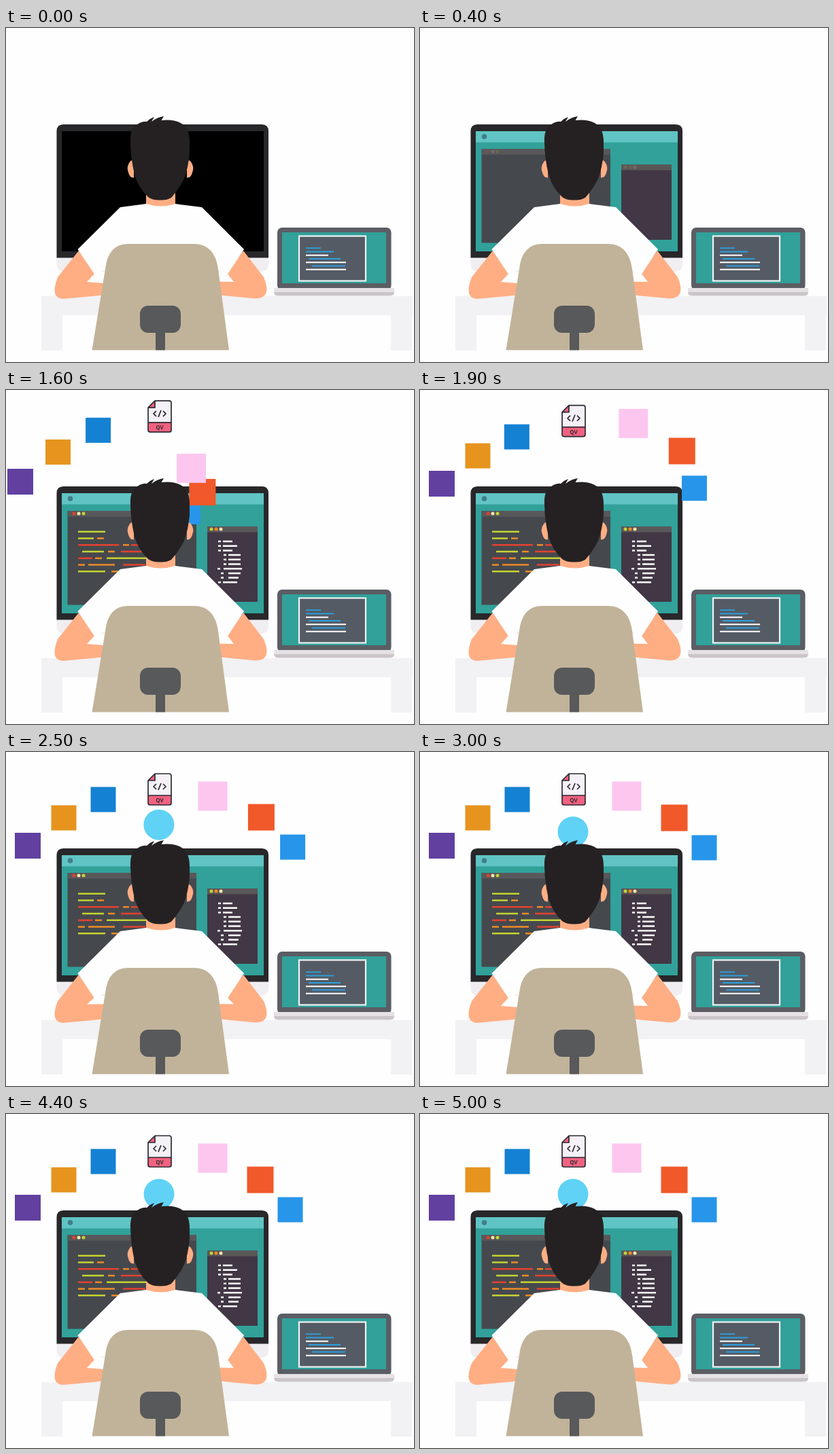
Animation, 600 px wide and 492 px high, one loop 5100 ms. Source, as an HTML page:

```html
<!DOCTYPE html>
<html lang="en">
<head>
<meta charset="utf-8">
<title>Developer at work</title>
<style>
html, body { margin: 0; width: 100%; height: 100%; overflow: hidden; background: #fefefe; }
svg { display: block; width: 600px; height: 492px; }
.tag { font: bold 8px "Open Sans", sans-serif; text-anchor: middle; fill: #3a2b35; }
</style>
</head>
<body>
<svg viewBox="0 0 600 492">
  <g fill="#f2f1f3">
    <rect x="52" y="395" width="546" height="28"/>
    <rect x="52" y="423" width="31" height="52"/>
    <rect x="566" y="423" width="31" height="52"/>
  </g>

  <rect x="74.500" y="142" width="311.500" height="217" rx="10" fill="#f0eef0"/>
  <path d="M74.500 338.500V152q0-10 10-10H376q10 0 10 10V338.500Z" fill="#28272a"/>
  <rect x="82" y="152" width="297" height="177" fill="#000"/>
  <g id="screen">
    <rect x="82" y="152" width="297" height="177" fill="#31a19a"/>
    <rect x="82" y="152" width="297" height="16.500" fill="#60c4c4"/>
    <circle cx="94.500" cy="160" r="3.800" fill="#417d8b"/>
  </g>
  <g id="windows">
    <rect x="90.500" y="178" width="189.500" height="138.500" fill="#45494e"/>
    <rect x="90.500" y="178" width="189.500" height="8.500" fill="#58585a"/>
    <rect x="296" y="201" width="74" height="111" fill="#423745"/>
    <rect x="296" y="201" width="74" height="8.500" fill="#5a5759"/>
  </g>
  <g id="dots"></g>
  <g id="code" stroke-width="2.500"></g>
  <svg x="296" y="210" width="74" height="102" viewBox="296 210 74 102">
    <g id="list" stroke="#fff" stroke-width="2.500"></g>
  </svg>

  <rect x="399" y="294" width="167.500" height="92" rx="7" fill="#5b5d64"/>
  <rect x="406" y="301" width="153" height="75" fill="#31a19a"/>
  <rect x="431" y="306.500" width="98" height="66" fill="#555b64" stroke="#f1f4f5" stroke-width="2.200"/>
  <g id="notes" stroke-width="1.900"></g>
  <path d="M394 383H571V389q0 5-6 5.500H400q-6-.5-6-5.500Z" fill="#cbc5c8"/>
  <rect x="394" y="383" width="177" height="6" fill="#e6e1e4"/>

  <g id="icons"></g>

  <g fill="#ffae84">
    <path d="M206 240H249V262L228 272 206 262Z"/>
    <path d="M188 196Q184 193 181 199 177 205 180 213 182 221 188 220.500Z"/>
    <path d="M266 196Q270 193 273 199 277 205 274 213 272 221 266 220.500Z"/>
    <path id="armL"/>
    <path id="armR"/>
  </g>
  <path d="M168 264 206 259Q228 266 249 259L288 264 350 326 326 362.500 312 357V400H145V356L130 362.500 105.500 326Z" fill="#fefefe"/>
  <path d="M183 168Q182 148 193 142 201 137 207 138 212 133 218 131L214 138Q223 131 232 130L228.500 136Q246 134 257 140 270 147 270 168V184Q268 206 262 222 254 238 243 250 236 254 227 253.500 216 254 209 249 195 236 189 216 183 190 183 168Z" fill="#252122"/>

  <path d="M126.500 474.500 146 355Q150 318 180 318H276Q307 318 312 355L328 474.500Z" fill="#c1b399"/>
  <rect x="197" y="409" width="60" height="40" rx="12" fill="#58595b"/>
  <rect x="220" y="448" width="14" height="26.500" fill="#58595b"/>
</svg>

<script>
const LOOP = 5100, STEP = 100;
const $ = id => document.getElementById(id);

function add(parent, tag, attrs) {
  const el = document.createElementNS("http://www.w3.org/2000/svg", tag);
  for (const key in attrs) el.setAttribute(key, attrs[key]);
  return parent.appendChild(el);
}

// Linear interpolation through [time, value] pairs
function track(keys, t) {
  if (t <= keys[0][0]) return keys[0][1];
  for (let i = 1; i < keys.length; i++) {
    const [a, u] = keys[i - 1], [b, v] = keys[i];
    if (t < b) return u + (v - u) * (t - a) / (b - a);
  }
  return keys[keys.length - 1][1];
}

const hue = { y: "#c5d42f", o: "#f08a24", r: "#e5402f", b: "#2a9fdc", w: "#fff", p: "#f5e6a8" };

function drawLine(parent, y, x1, x2, color) {
  return add(parent, "path", { d: `M${x1} ${y}H${x2}`, stroke: hue[color] });
}

[[100, 182, "r"], [107, 182, "p"], [114, 182, "y"],
 [302, 205, "y"], [309, 205, "o"], [316, 205, "p"]].forEach(([cx, cy, c]) =>
  add($("dots"), "circle", { cx, cy, r: 2.5, fill: hue[c] }));

const codeRows = [
  "106-146y", "106-129y 134-144o", "106-166r 172-181o 184-200r",
  "112-144y 150-160o 169-200r", "106-127r 131-141o 148-206y",
  "106-116o 121-160o 172-205r", "106-146y 155-166o"
].map((row, i) => {
  const g = add($("code"), "g", {});
  for (const part of row.split(" ")) {
    const [x1, x2] = part.slice(0, -1).split("-");
    drawLine(g, 208.8 + i * 9.75, x1, x2, part.slice(-1));
  }
  return g;
});

// Marker start, text start, text end
[[312, 319, 333], [312, 319, 340], [312, 319, 333], [320, 327, 345], [320, 327, 345],
 [320, 327, 345], [311, 320, 347], [316, 327, 345], [316, 327, 342], [312, 319, 340]]
  .forEach(([m, a, b], i) =>
    add($("list"), "path", { d: `M${m} ${223 + i * 6.7}h4M${a} ${223 + i * 6.7}H${b}` }));

[[441, 463, "b"], [441, 482, "b"], [441, 474, "w"], [445, 492, "b"],
 [441, 500, "w"], [450, 499, "b"], [441, 500, "w"]].forEach(([a, b, c], i) =>
  drawLine($("notes"), 324.2 + i * 5.25, a, b, c));

function square(g, size, fill) {
  add(g, "rect", { x: -size / 2, y: -size / 2, width: size, height: size, fill });
}

function disc(g, r, fill) {
  add(g, "circle", { r, fill });
}

function page(g) {
  const ink = "#2d2a35", pink = "#f0627f";
  add(g, "path", { d: "M-7-23H14q3 0 3 3V20q0 3-3 3H-14q-3 0-3-3V-13Z", fill: "#f5f1f6" });
  add(g, "path", { d: "M-17 9H17V20q0 3-3 3H-14q-3 0-3-3ZM-17-13-7-23V-13Z", fill: pink });
  add(g, "path", {
    d: "M-7-23H14q3 0 3 3V20q0 3-3 3H-14q-3 0-3-3V-13ZM-17-13H-7V-23M-17 9H17M-5-8-9-4-5 0M5-8 9-4 5 0M2-9-2 1",
    fill: "none", stroke: ink, "stroke-width": 1.7, "stroke-linejoin": "round"
  });
  add(g, "text", { class: "tag", y: 19 }).textContent = "QV";
}

const HOME = [226, 190];
const fly = [[0, 0], [100, .36], [350, .9], [420, 1.07], [550, 1.15],
             [800, 1.07], [950, 1.02], [1100, 1]];

// Launch time, resting place, drawing
const icons = [
  [1950, 225, 118, g => disc(g, 22.5, "#5fd2f6")],
  [1540, 418, 141, g => square(g, 37, "#2795ea")],
  [1470, 374, 97, g => square(g, 39, "#f1582a")],
  [1390, 304, 65, g => square(g, 43, "#fcc6ef")],
  [1100, 226, 55, page],
  [860, 143, 70, g => square(g, 37, "#1581d3")],
  [770, 85, 97, g => square(g, 37, "#e6941e")],
  [760, 32, 138, g => square(g, 38, "#6140a0")]
].map(([start, x, y, draw]) => {
  const g = add($("icons"), "g", {});
  draw(g);
  return { start, x, y, g };
});

function render(t) {
  const fade = (id, a, b) => $(id).setAttribute("opacity", track([[a, 0], [b, 1]], t));
  fade("screen", 0, 300);
  fade("windows", 100, 400);
  fade("dots", 350, 700);
  codeRows.forEach((g, i) =>
    g.setAttribute("opacity", track([[500 + i * 60, 0], [650 + i * 60, 1]], t)));

  $("list").setAttribute("opacity", track([[900, 0], [1200, .55], [1500, 1]], t));
  $("list").setAttribute("transform", `translate(0 ${track([[900, 48], [1200, 24], [1500, 0]], t)})`);

  for (const { start, x, y, g } of icons) {
    const p = track(fly, t - start);
    const px = HOME[0] + (x - HOME[0]) * p, py = HOME[1] + (y - HOME[1]) * p;
    g.setAttribute("transform", `translate(${px} ${py})`);
    g.setAttribute("visibility", t < start ? "hidden" : "visible");
  }

  const lift = track([[2200, 0], [2500, 5], [2800, 0]], t);
  $("armL").setAttribute("d",
    `M107 328 76 367Q64 398 84 399L150 393V${376.5 - lift}L119 ${374 - lift / 2} 131 361Z`);
  $("armR").setAttribute("d",
    `M349 328 379 367Q392 398 367 398.500L308 393V${373.5 - lift / 2}L335 ${374 - lift / 2} 325 361Z`);
}

const begun = performance.now();
function tick() {
  const t = (performance.now() - begun) % LOOP;
  render(Math.floor(t / STEP) * STEP);
  requestAnimationFrame(tick);
}
tick();
</script>
</body>
</html>
```
